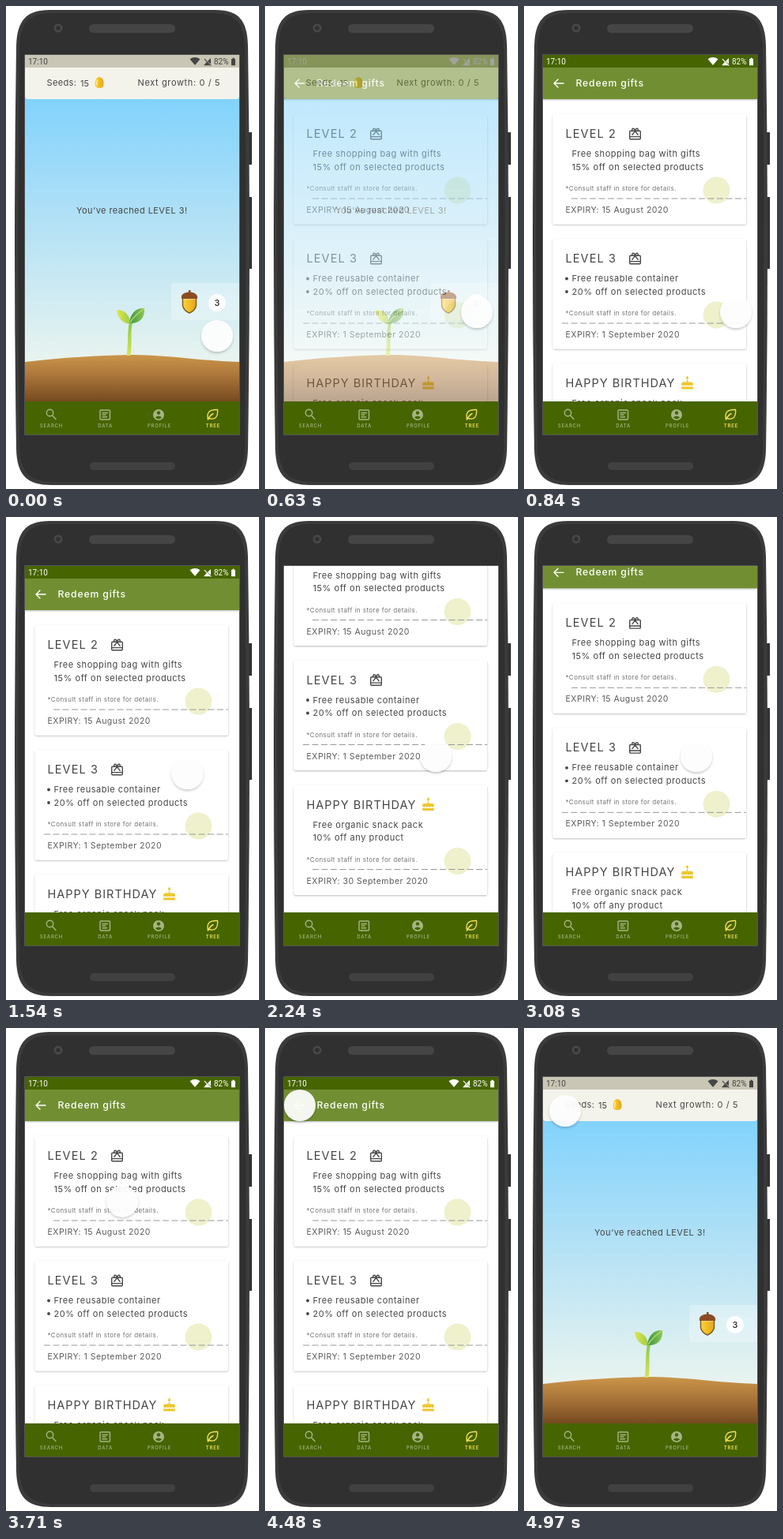
Animation of 320 by 612 pixels, one loop 5040 ms. Source, as an HTML page:

```html
<!DOCTYPE html>
<html lang="en">
<head>
<meta charset="utf-8">
<title>Redeem gifts</title>
<style>
html, body { margin: 0; width: 100%; height: 100%; overflow: hidden; background: #fff; }
svg { display: block; width: 320px; height: 612px; }
text { font-family: Inter, "Open Sans", sans-serif; fill: #454545; }
.bar { font: 10px Roboto, sans-serif; }
.nav text { font-size: 6px; font-weight: 500; text-anchor: middle; letter-spacing: .8px; fill: #a5b584; }
.nav .on { fill: #f4e155; font-weight: 600; }
.line { fill: none; stroke-width: 1.4; stroke-linecap: round; stroke-linejoin: round; }
</style>
</head>
<body>
<svg viewBox="0 0 320 612">
  <defs>
    <linearGradient id="sky" x2="0" y2="1">
      <stop offset="0" stop-color="#80d2fd"/><stop offset=".45" stop-color="#b0e0f6"/>
      <stop offset="1" stop-color="#e9f4ef"/>
    </linearGradient>
    <linearGradient id="soil" x2="0" y2="1">
      <stop offset="0" stop-color="#cb9549"/><stop offset=".45" stop-color="#aa753a"/>
      <stop offset="1" stop-color="#74491f"/>
    </linearGradient>
    <linearGradient id="stalk" x2="0" y2="1"><stop offset="0" stop-color="#8ccb4b"/><stop offset="1" stop-color="#d9e35c"/></linearGradient>
    <linearGradient id="leaf"><stop offset="0" stop-color="#dfe64f"/><stop offset="1" stop-color="#a0cd48"/></linearGradient>
    <linearGradient id="leaf2"><stop offset="0" stop-color="#3f9350"/><stop offset="1" stop-color="#8cc84c"/></linearGradient>
    <linearGradient id="gold"><stop offset="0" stop-color="#fbd437"/><stop offset="1" stop-color="#e5a41c"/></linearGradient>
    <clipPath id="view"><rect x="24" y="62" width="271" height="481"/></clipPath>
    <clipPath id="page"><rect x="24" y="62" width="271" height="439"/></clipPath>
    <filter id="soft" x="-20%" y="-20%" width="140%" height="150%">
      <feDropShadow dx="0" dy="1" stdDeviation="1.2" flood-opacity=".28"/>
    </filter>
    <filter id="lift" x="-40%" y="-40%" width="180%" height="190%">
      <feDropShadow dx="0" dy="2" stdDeviation="1.5" flood-opacity=".22"/>
    </filter>
    <g id="gift" class="line" stroke="#484848">
      <rect x="-6.8" y="-3.8" width="13.6" height="10.6" rx="1"/>
      <path d="M-6.8 3.6H6.8M-3.6 1.2L0-3.4L3.6 1.2M0-3.8C-1.2-8-4.6-7.3-3.6-4M0-3.8C1.2-8 4.6-7.3 3.6-4"/>
    </g>
    <g id="cake" fill="#edc72f">
      <path d="M0-9.5C2.4-6.5 1.6-4.8 0-4.8S-2.4-6.5 0-9.5ZM-.8-4H.8V-1.6H5.2Q7.3-1.6 7.3.6V2.2Q5.3 4 3.6 2.2Q1.8 4 0 2.2Q-1.8 4-3.6 2.2Q-5.3 4-7.3 2.2V.6Q-7.3-1.6-5.2-1.6H-.8Z"/>
      <path d="M-7.3 4Q-5.2 5-3.6 3.9Q-1.8 5.2 0 3.9Q1.8 5.2 3.6 3.9Q5.2 5 7.3 4V7.6H-7.3Z"/>
    </g>
    <g id="status">
      <text class="bar" x="28" y="74" style="fill:inherit">17:10</text>
      <path d="M232.500 67.300Q239 62.800 245.500 67.300L239 75Z"/>
      <path d="M255 70L259 66V73.600ZM250 75.200L253.800 71L258 75.200ZM250.500 67.600L251.300 66.800L259.700 75.200L258.900 76Z"/>
      <text class="bar" x="263" y="74" style="fill:inherit">82%</text>
      <path d="M285 67H286.500V65.700H288.700V67H290V75.300H285Z"/>
    </g>
  </defs>

  <!-- handset -->
  <path d="M307 160H311V201H307ZM307 242H311V333H307Z" fill="#333"/>
  <path d="M55 5H265C295 5 305 19 306 50Q310 306 306 562C305 594 294 607 263 607H57C26 607 14 594 13 562Q9 306 13 50C14 19 25 5 55 5Z" fill="#3b3b3b"/>
  <path d="M57 9H263C290 9 301 22 302 52Q305 306 302 560C301 590 290 603 261 603H59C30 603 18 590 17 560Q14 306 17 52C18 22 29 9 57 9Z" fill="#303030"/>
  <rect x="105" y="23" width="109" height="11" rx="5.500" fill="#454545"/>
  <rect x="106" y="578" width="108" height="10" rx="5" fill="#414141"/>
  <circle cx="66" cy="28" r="5.500" fill="#484848"/><circle cx="66" cy="28" r="2.800" fill="#303030"/>
  <rect x="23.500" y="61.500" width="272" height="482" fill="#777"/>

  <g clip-path="url(#view)">
    <g id="tree">
      <rect x="24" y="62" width="271" height="390" fill="#f4f3eb"/>
      <rect x="24" y="112" width="271" height="340" fill="url(#sky)"/>
      <path d="M24 78H295V114Q295 118 291 118H28Q24 118 24 114Z" fill="#f4f3eb"/>
      <rect x="24" y="62" width="271" height="16" fill="#c9c6b6"/>
      <use href="#status" fill="#444"/>
      <g font-size="11">
        <text x="51.500" y="101" letter-spacing=".36">Seeds:</text>
        <text x="94" y="101.500" letter-spacing=".1">15</text>
        <text x="166.500" y="101" letter-spacing=".62">Next growth: 0 / 5</text>
        <text x="89" y="262.500" letter-spacing=".44">You’ve reached LEVEL 3!</text>
      </g>
      <path d="M118 90C121.500 90 123.500 94 123.500 98.500Q123.500 104 118 104T112.500 98.500C112.500 94 114.500 90 118 90Z" fill="url(#gold)"/>
      <path d="M115.500 94Q114 97 115 100" class="line" stroke="#fff0a0"/>
      <path d="M24 451C75 445 115 443 155 442S240 449 295 451V502H24Z" fill="url(#soil)"/>
      <path d="M152.500 443C155 430 153 412 156 401L160 401C157 414 160 430 157.500 443Z" fill="url(#stalk)"/>
      <path d="M157 403C147 402 141 395 140 385C151 385 157 392 157 403Z" fill="url(#leaf)"/>
      <path d="M156 402C157 389 165 382 175 383C176 396 168 403 156 402Z" fill="url(#leaf2)"/>
      <path d="M157 401C161 394 167 389 174 384" class="line" stroke="#b9dc62"/>
      <path d="M295 351H213Q209 351 209 355V394Q209 398 213 398H295Z" fill="#fff" fill-opacity=".28"/>
      <path d="M223.500 371H240.500V380Q239 386 232 389Q225 386 223.500 380Z" fill="url(#gold)" stroke="#fff3c0"/>
      <path d="M223.500 371V380Q225 386 232 389Q239 386 240.500 380V371" class="line" stroke="#7b5a1c" stroke-width=".8"/>
      <path d="M222 371Q220.500 365 228 363L231 362.500V360H233.500V362.500Q243.500 364 242 371Z" fill="#8b4c22"/>
      <circle cx="267" cy="376" r="11" fill="#fff"/>
      <text x="267" y="380" font-size="11" font-weight="500" text-anchor="middle" style="fill:#222">3</text>
    </g>

    <g id="gifts" clip-path="url(#page)">
      <rect x="24" y="62" width="271" height="440" fill="#fff"/>
      <g id="cards"></g>
      <g id="top">
        <rect x="24" y="78" width="271" height="40" fill="#718f31" filter="url(#soft)"/>
        <rect x="24" y="62" width="271" height="16" fill="#466400"/>
        <use href="#status" fill="#fff"/>
        <path d="M50 98H38.500M43 93L38 98L43 103" class="line" stroke="#fff" stroke-width="1.600"/>
        <text x="65.500" y="102" font-size="12.200" font-weight="500" letter-spacing=".85" style="fill:#fff">Redeem gifts</text>
      </g>
    </g>

    <g class="nav">
      <rect x="24" y="501" width="271" height="42" fill="#466400"/>
      <g class="line" stroke="#a5b584" stroke-width="1.600">
        <circle cx="55.500" cy="515.500" r="4.200"/><path d="M58.800 519L63 523.500"/>
        <rect x="119" y="512" width="12.500" height="12" rx="1"/>
        <path d="M122 515.500H128.500M122 518H126M122 520.800H127.500"/>
      </g>
      <circle cx="193" cy="518" r="7" fill="#a5b584"/>
      <circle cx="193" cy="515.500" r="2.200" fill="#466400"/>
      <path d="M188.800 521.300Q193 517.500 197.200 521.300Q193 525.500 188.800 521.300Z" fill="#466400"/>
      <path d="M255.500 524C253.500 514 258 511 267.500 511.500C268.500 520 265 525 257 522.500M255.500 524Q258 518.500 262 516.500" class="line" stroke="#f4e155" stroke-width="1.600"/>
      <text x="57.400" y="534">SEARCH</text><text x="125.700" y="534">DATA</text>
      <text x="194" y="534">PROFILE</text><text x="262" y="534" class="on">TREE</text>
    </g>
  </g>
  <g id="touch" filter="url(#lift)">
    <circle r="20" fill="#fff" fill-opacity=".92"/>
  </g>
</svg>
<script>
const LOOP = 5040, STEP = 70;
const $ = id => document.getElementById(id);

const offers = [
  { title: "LEVEL 2", gap: 1.1, icon: "gift", x: 140.5, lines: ["Free shopping bag with gifts", "15% off on selected products"], date: "15 August 2020" },
  { title: "LEVEL 3", gap: 1.1, icon: "gift", x: 140.5, lines: ["Free reusable container", "20% off on selected products"], date: "1 September 2020", dots: true },
  { title: "HAPPY BIRTHDAY", gap: 1, icon: "cake", x: 206.5, lines: ["Free organic snack pack", "10% off any product"], date: "30 September 2020" }
];

const label = (x, y, size, gap, str, fill = "#454545") =>
  `<text x="${x}" y="${y}" font-size="${size}" letter-spacing="${gap}" style="fill:${fill}">${str}</text>`;

$("cards").innerHTML = offers.map((o, i) => `
  <g transform="translate(0 ${i * 158})">
    <rect x="36.5" y="137" width="244.500" height="139.500" rx="2.500" fill="#fff" filter="url(#soft)"/>
    <circle cx="243.500" cy="233.500" r="17" fill="#eef1cc"/>
    ${label(52.5, 167, 14.5, o.gap, o.title)}
    <use href="#${o.icon}" x="${o.x}" y="162"/>
    ${o.lines.map((s, n) => label(60.5, 191 + n * 16.5, 11, .54, s) +
      (o.dots ? `<circle cx="54" cy="${187.5 + n * 16.5}" r="1.900" fill="#454545"/>` : "")).join("")}
    ${label(52.5, 234, 8, .44, "*Consult staff in store for details.", "#707070")}
    <path d="M${o.dots ? 48 : 60} 244H281" stroke="#999" stroke-dasharray="8 3.500"/>
    ${label(52.5, 262, 10.5, .5, "EXPIRY: " + o.date, "#5a5a5a")}
  </g>`).join("");

// Rows are [time, value, ...]; values ease between rows.
// The pointer rests while the page scrolls beneath it.
const pointer = [
  [0, 267, 418], [420, 268, 388], [1120, 268, 388], [1750, 216, 303],
  [2240, 216, 303], [2660, 218, 303], [3220, 218, 303], [4340, 44, 98],
  [4760, 44, 98], [4970, 52, 105]
];
const scroll = [[1750, 0], [2200, 113.5], [2890, 113.5], [3170, 0]];
const fade = [[490, 0], [770, 1], [4480, 1], [4780, 0]];

function at(rows, t) {
  const n = rows.findIndex(r => r[0] > t);
  if (n < 0) return rows[rows.length - 1].slice(1);
  if (n === 0) return rows[0].slice(1);
  const a = rows[n - 1], b = rows[n];
  const p = (t - a[0]) / (b[0] - a[0]), e = p * p * (3 - 2 * p);
  return a.slice(1).map((v, i) => v + (b[i + 1] - v) * e);
}

function draw(now) {
  const t = Math.floor(now % LOOP / STEP) * STEP;
  const [x, y] = at(pointer, t), [s] = at(scroll, t), [f] = at(fade, t);
  $("touch").setAttribute("transform", `translate(${x} ${y})`);
  for (const id of ["cards", "top"]) $(id).setAttribute("transform", `translate(0 ${-s})`);
  $("gifts").setAttribute("opacity", f);
}

const start = performance.now();
function tick() {
  draw(performance.now() - start);
  requestAnimationFrame(tick);
}
tick();
</script>
</body>
</html>
```
